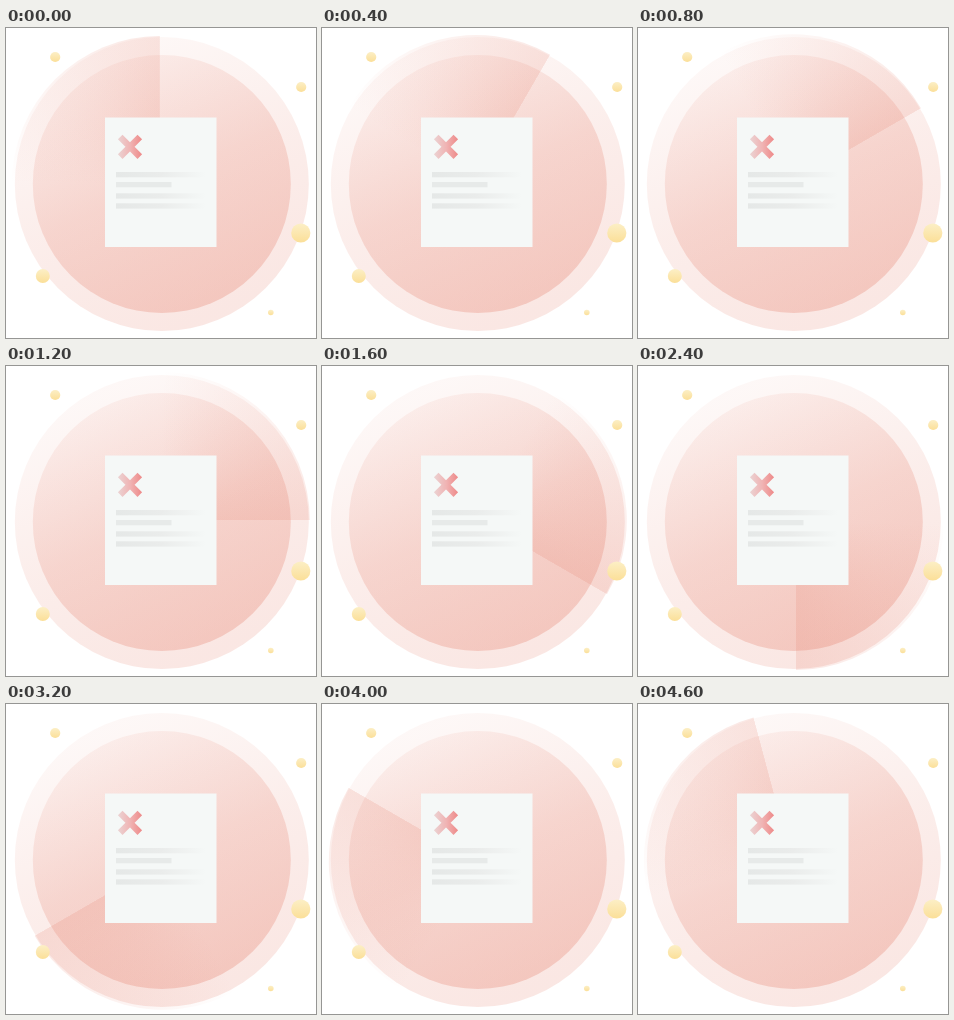
Recreate the animation shown at these times as an HTML page with a canvas. Size 310 by 310 pixels, loop 4.8 s.

```html
<!DOCTYPE html>
<html lang="en">
<head>
<meta charset="utf-8">
<title>Rejected document</title>
<style>
  html, body { margin: 0; width: 100%; height: 100%; overflow: hidden; background: #fff; }
  canvas { display: block; width: 310px; height: 310px; }
</style>
</head>
<body>
<canvas id="stage" width="310" height="310"></canvas>
<script>
const ctx = document.getElementById('stage').getContext('2d');
const LOOP = 4800, STEP = 200;
const CX = 155.8, CY = 156;
const red = a => `rgba(226,112,90,${a})`;

function linear(x0, y0, x1, y1, ...colors) {
  const g = ctx.createLinearGradient(x0, y0, x1, y1);
  colors.forEach((c, i) => g.addColorStop(i / (colors.length - 1), c));
  return g;
}

function disc(x, y, r, fill) {
  ctx.fillStyle = fill;
  ctx.beginPath();
  ctx.arc(x, y, r, 0, Math.PI * 2);
  ctx.fill();
}

function halo() {
  disc(CX, CY, 147, linear(95, 30, 205, 285, red(0.05), red(0.12), red(0.17)));
  disc(CX, CY, 129, linear(95, 40, 205, 275, red(0.08), red(0.2), red(0.27)));
}

// Quarter circle whose leading edge is strongest and fades out behind it
function sweep(turn) {
  const start = -Math.PI, end = -Math.PI / 2;
  ctx.save();
  ctx.translate(CX, CY);
  ctx.rotate(turn * Math.PI * 2);
  ctx.translate(-2, 0);
  const g = ctx.createConicGradient(start, 0, 0);
  g.addColorStop(0, red(0));
  g.addColorStop(0.25, red(0.16));
  g.addColorStop(0.2501, red(0));
  g.addColorStop(1, red(0));
  ctx.fillStyle = g;
  ctx.beginPath();
  ctx.moveTo(0, 0);
  ctx.arc(0, 0, 148, start, end);
  ctx.fill();
  ctx.restore();
}

function bar(y, width, faded) {
  ctx.fillStyle = faded ? linear(110, 0, 110 + width, 0, '#e5e8e7', '#eaeceb', '#f5f8f7') : '#e7eae9';
  ctx.fillRect(110, y, width, 5.3);
}

function paper() {
  ctx.fillStyle = '#f5f8f7';
  ctx.fillRect(99, 89.5, 111.5, 129.5);

  ctx.strokeStyle = linear(112, 0, 137, 0, '#ebd3d3', '#f0b3b3', '#ee8685');
  ctx.lineWidth = 6.5;
  ctx.beginPath();
  ctx.moveTo(114.2, 109);
  ctx.lineTo(133.8, 128.6);
  ctx.moveTo(133.8, 109);
  ctx.lineTo(114.2, 128.6);
  ctx.stroke();

  bar(144, 90, true);
  bar(154, 55.5, false);
  bar(165.3, 90, true);
  bar(175.3, 90, true);
}

function ball(x, y, r) {
  disc(x, y, r, linear(0, y - r, 0, y + r, '#fcefc6', '#fbdf98'));
}

function draw(now) {
  const t = Math.floor((now % LOOP) / STEP) * STEP;
  ctx.fillStyle = '#fff';
  ctx.fillRect(0, 0, 310, 310);
  halo();
  sweep(t / LOOP);
  paper();
  ball(49.2, 29, 5.1);
  ball(295.2, 59, 5.1);
  ball(294.8, 205, 9.6);
  ball(36.8, 248, 7);
  ball(264.8, 284.5, 2.8);
}

let begin = null;
function tick(now) {
  if (begin === null) begin = now;
  draw(now - begin);
  requestAnimationFrame(tick);
}
draw(0);
requestAnimationFrame(tick);
</script>
</body>
</html>
```
